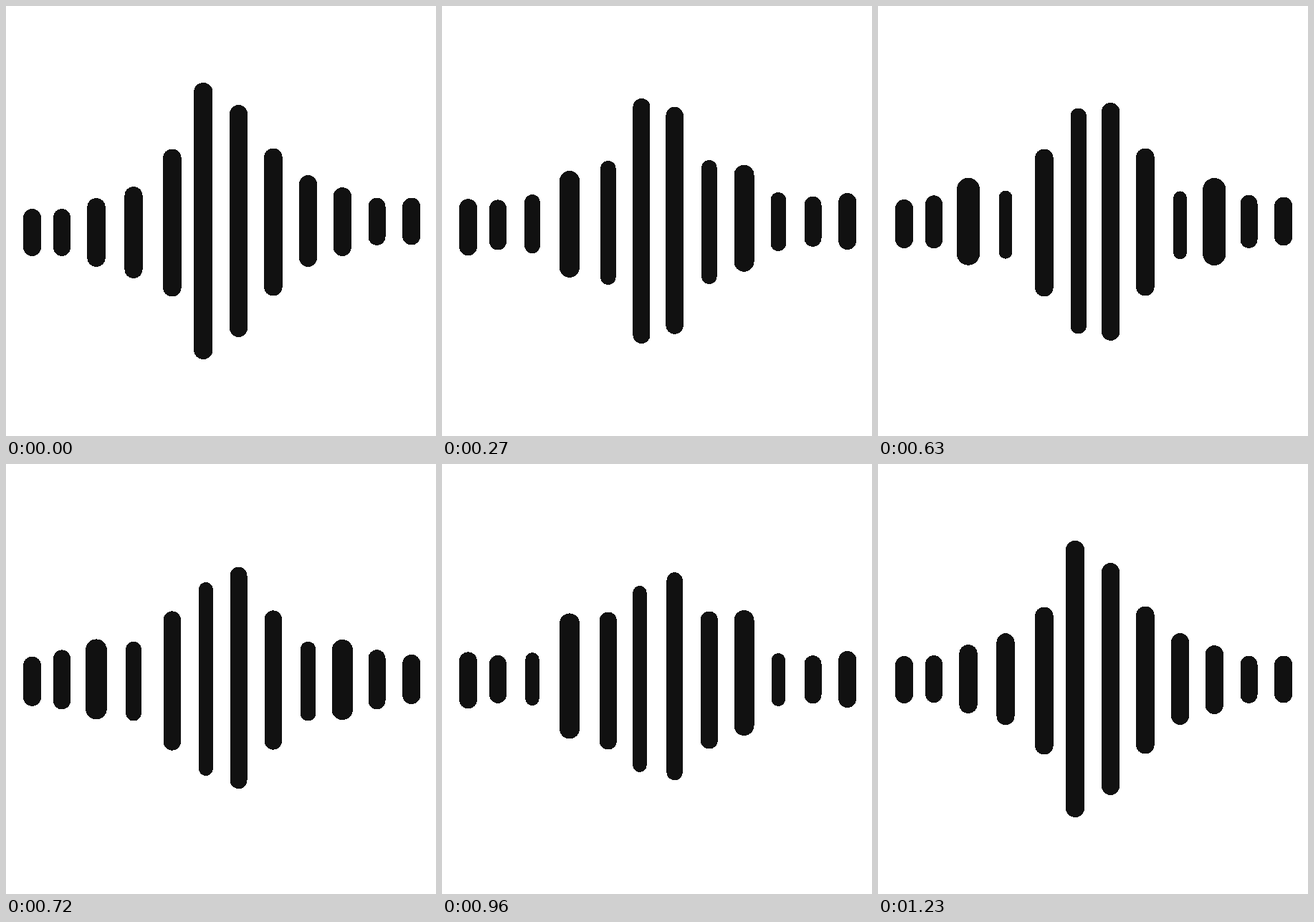
Animation, 600 px wide and 600 px high, one loop 1.26 s. Source, as an HTML page:

```html
<!DOCTYPE html>
<html lang="en">
<head>
<meta charset="utf-8">
<title>Sound wave</title>
<style>
  html, body { margin: 0; width: 100%; height: 100%; overflow: hidden; background: #fff; }
  svg { display: block; width: 100%; height: 100%; }
  rect { fill: #111; shape-rendering: crispEdges; }
</style>
</head>
<body>
<svg id="stage" viewBox="0 0 600 600"></svg>
<script>
const LOOP = 1260, STEP = 30, MID = 300;
const KEYS = [0, 270, 480, 630, 840, 960, 1230];
const stage = document.getElementById('stage');
const bars = [];

// Smooth curve through key heights that never overshoots and ends where it began.
function pulse(...heights) {
  const v = [...heights, heights[0]];
  const rate = i => (v[i + 1] - v[i]) / (KEYS[i + 1] - KEYS[i]);
  const slope = v.map((_, i) => {
    if (i === 0 || i === v.length - 1) return 0;
    const a = rate(i - 1), b = rate(i);
    return a * b > 0 ? 2 * a * b / (a + b) : 0;
  });
  return t => {
    let i = 0;
    while (i < KEYS.length - 2 && t >= KEYS[i + 1]) i++;
    const span = KEYS[i + 1] - KEYS[i];
    const u = Math.min(1, (t - KEYS[i]) / span), r = 1 - u;
    return v[i] * r * r * (1 + 2 * u) + v[i + 1] * u * u * (3 - 2 * u)
      + span * u * r * (slope[i] * r - slope[i + 1] * u);
  };
}

// Placement rules take the bar's height and the time.
const over = ratio => h => h / ratio;
const settle = (decay, lift = () => 0) => (h, t) => MID + 16 * Math.exp(-t / decay) + lift(h);
const rise = (rest, amount) => h => (rest - h) * amount;
const sway = (x, reach) => (h, t) => x + reach * Math.sin(2 * Math.PI * (t - 200) / LOOP);

function bar(height, width, x, y) {
  const el = document.createElementNS('http://www.w3.org/2000/svg', 'rect');
  stage.append(el);
  bars.push({ el, height, width, x, y });
}

// Two opposite bars share one size but drift on their own.
function pair(height, width, left, right) {
  bar(height, width, ...left);
  bar(height, width, ...right);
}

pair(pulse(66, 79, 73, 68, 73, 79), 25, [36.5, settle(450)], [565.7, 300.5]);
pair(pulse(66, 70, 63, 74, 91, 67), 24, [78, settle(250)], [517.5, 300.8]);
pair(pulse(96, 82, 110, 122, 89, 74), over(3.8), [126, settle(200)], [469.3, 301]);
pair(pulse(128, 149, 120, 95, 148, 175), h => Math.min(28, h / 5.1),
  [178, settle(300, rise(128, 0.1))],
  [421.5, h => MID + rise(128, 0.18)(h)]);
pair(pulse(206, 173, 208, 206, 178, 192), over(8), [231.8, 302.5], [372.8, 301.5]);
bar(pulse(386, 342, 372, 315, 230, 260), h => 5 + h / 18, sway(277.5, 2.7), MID);
bar(pulse(324, 317, 305, 332, 275, 290), over(13), 324.6, h => MID + rise(324, -0.11)(h));

function draw(t) {
  for (const b of bars) {
    const h = b.height(t);
    const get = rule => typeof rule === 'function' ? rule(h, t) : rule;
    const w = get(b.width);
    const box = { x: get(b.x) - w / 2, y: get(b.y) - h / 2, width: w, height: h, rx: w / 2 };
    for (const name in box) b.el.setAttribute(name, box[name].toFixed(2));
  }
}

const start = performance.now();
function tick() {
  const t = (performance.now() - start) % LOOP;
  draw(Math.floor(t / STEP) * STEP);
  requestAnimationFrame(tick);
}
tick();
</script>
</body>
</html>
```
